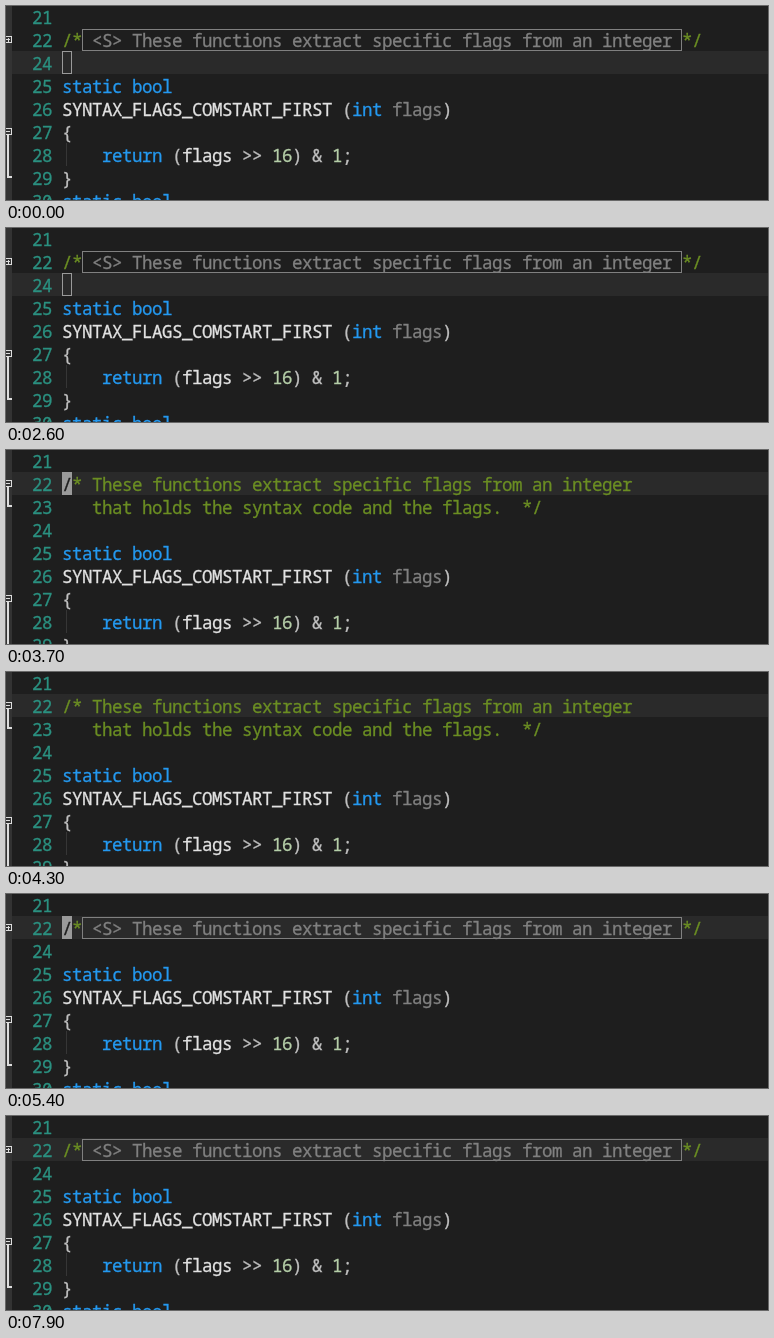
Write an HTML page that moves like this. It is 762 px wide and 194 px high and loops after 8 s.

```html
<!DOCTYPE html>
<html>
<head>
<meta charset="utf-8">
<style>
html, body { margin: 0; width: 762px; height: 194px; overflow: hidden; background: #1e1e1e; }
body { position: relative; font: 17.5px/23px "Noto Sans Mono", "DejaVu Sans Mono", monospace; letter-spacing: -.5px; color: #c0c0c0; -webkit-text-stroke: .3px; }
main { position: absolute; top: -1px; width: 100%; }
svg { position: absolute; left: 0; top: 0; background: #333; }
svg path { fill: none; stroke: #ddd; shape-rendering: crispEdges; }
svg .bar { stroke-width: 2; }
.row { position: relative; box-sizing: border-box; height: 23px; white-space: pre; padding: 1px 0 0 56px; }
.row::before { content: attr(data-n); position: absolute; left: 26px; color: #2b9181; }
.at { background: #2a2a2a; }
b { font-weight: inherit; color: #e2e2e2; }
.key { color: #2499f0; }
.arg { color: #808080; }
.num { color: #b5cea8; }
.note { color: #6b8e23; }
.fold { display: inline-block; height: 22px; line-height: 22px; vertical-align: top; color: #808080; box-shadow: inset 0 0 0 1px #808080; }
.guide { position: absolute; left: 60px; top: 0; width: 1px; height: 23px; background: #363636; }
#cursor { position: absolute; left: 56px; width: 10px; height: 23px; box-sizing: border-box; border: 1px solid #9a9a9a; color: #1e1e1e; text-indent: -1px; }
#cursor.solid { background: #9a9a9a; }
.folded .open, .unfolded .shut { display: none; }
</style>
</head>
<body class="folded">
<main>
<div class="row" data-n="21"></div>
<div class="row" data-n="22" id="top"><span class="open note">/* These functions extract specific flags from an integer</span><span class="shut note">/*<span class="fold"> &lt;S&gt; These functions extract specific flags from an integer </span>*/</span></div>
<div class="row open note" data-n="23">   that holds the syntax code and the flags.  */</div>
<div class="row" data-n="24" id="blank"></div>
<div class="row key" data-n="25">static bool</div>
<div class="row" data-n="26"><b>SYNTAX_FLAGS_COMSTART_FIRST</b> (<span class="key">int</span> <span class="arg">flags</span>)</div>
<div class="row" data-n="27">{</div>
<div class="row" data-n="28"><i class="guide"></i>    <span class="key">return</span> (<b>flags</b> &gt;&gt; <span class="num">16</span>) &amp; <span class="num">1</span>;</div>
<div class="row" data-n="29">}</div>
<div class="row key" data-n="30">static bool</div>
<div id="cursor"></div>
</main>
<svg width="6" height="194">
  <g class="shut">
    <path d="M-1 30.5H5.5V36.5H-1M0 33.5H4M2.5 32V36M-1 122.5H5.5V128.5H-1M0 125.5H4"/>
    <path class="bar" d="M2 129V171H6"/>
  </g>
  <g class="open">
    <path d="M-1 30.5H5.5V36.5H-1M0 33.5H4M-1 145.5H5.5V151.5H-1M0 148.5H4"/>
    <path class="bar" d="M2 37V56H6M2 152V194"/>
  </g>
</svg>
<script>
const FOCUS = 3500, UNFOLD = 3700, FOLD = 5400, LOOP = 8000, BLINK = 500;
const el = id => document.getElementById(id);
const cursor = el('cursor');

function draw(now) {
  const t = now % LOOP;
  const moved = t >= UNFOLD;
  const open = moved && t < FOLD;
  const since = t - (open ? UNFOLD : FOLD);
  const lit = !moved || Math.floor(since / BLINK) % 2 === 0;

  document.body.className = open ? 'unfolded' : 'folded';
  el('top').classList.toggle('at', moved);
  el('blank').classList.toggle('at', !moved);
  cursor.className = t >= FOCUS ? 'solid' : '';
  cursor.style.top = (moved ? 23 : 46) + 'px';
  cursor.style.visibility = lit ? 'visible' : 'hidden';
  cursor.textContent = moved ? '/' : '';
}

function loop() {
  draw(performance.now());
  requestAnimationFrame(loop);
}
loop();
</script>
</body>
</html>
```
